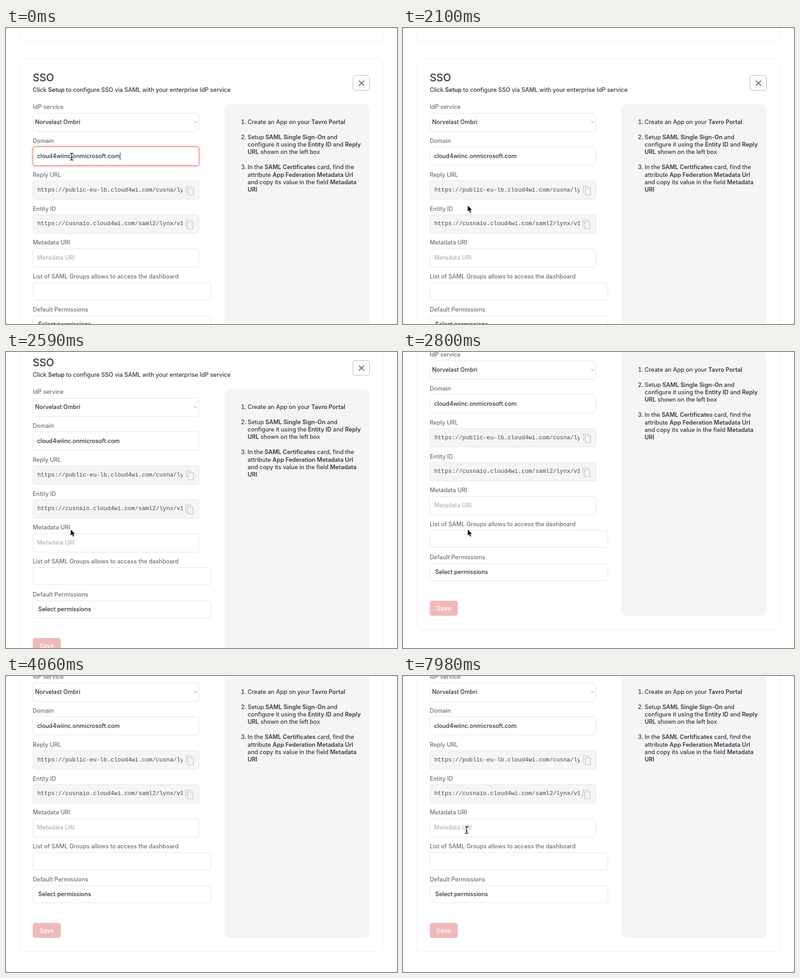
These frames come from a looping animation (848x644 px, 8000 ms). An HTML page:

```html
<!DOCTYPE html>
<html lang="en">
<head>
<meta charset="utf-8">
<title>SSO setup</title>
<style>
html, body { margin: 0; width: 100%; height: 100%; overflow: hidden; background: #fff; }
#stage { position: relative; width: 848px; height: 644px; overflow: hidden; background: #fff;
  font: 500 12.6px Inter, "Liberation Sans", sans-serif; color: #363741; }
#stage div, #stage svg { position: absolute; box-sizing: border-box; }
#page { left: 0; top: 0; width: 848px; height: 830px; }
b { font-weight: 600; }
.text { white-space: pre; line-height: 20px; height: 20px; }
.title { font-size: 22.5px; }
.label { color: #6c7079; }
.value { color: #2d2e36; }
.hint { color: #b2b4b7; }
.mono { font: 400 12.6px/20px "Liberation Mono", monospace; color: #46484e; width: 315px; overflow: hidden; }
.num { width: 30px; text-align: right; font-variant-numeric: tabular-nums; }
.save { font-size: 13.5px; color: #fff; }
.card { border: 1px solid #f2f2f2; border-radius: 8px; box-shadow: 0 0 2px 1px rgba(0, 0, 0, .018); }
.field { border: 1px solid #dfe5e5; border-radius: 5px; background: #fff; }
.off { background: #f5f5f5; }
.panel { background: #f5f5f5; border-radius: 9px; }
.close { border: 1px solid #b1b2b8; border-radius: 5px; }
.button { background: #f1b9b9; border: 1px solid #f4c9c9; border-radius: 5px; }
.ring { border: 1px solid #e5796f; border-radius: 5px; box-shadow: 0 0 4px 1px rgba(229, 100, 90, .55); }
.caret { background: #111; }
#frame { inset: 0; border-radius: 2.5px; box-shadow: 0 0 0 4px #8d8d8d; }
svg { overflow: visible; fill: none; }
</style>
</head>
<body>
<div id="stage">
  <div id="page"></div>
  <svg id="arrow" width="12" height="18" style="left:0;top:0"><path d="M0 0V12.8L2.9 10.1L5.1 15.2L7.2 14.3L5 9.3H9.1Z" fill="#000" stroke="#fff" stroke-width="1.6" paint-order="stroke" stroke-linejoin="round"/></svg>
  <svg id="beam" width="10" height="18" style="left:0;top:0">
    <g id="bar"><path d="M-3.5 -7.5Q-.5 -7.5 0 -6Q.5 -7.5 3.5 -7.5M0 -6V6M-3.5 7.5Q-.5 7.5 0 6Q.5 7.5 3.5 7.5M-2 2.5H2"/></g>
  </svg>
  <div id="frame"></div>
</div>
<script>
const $ = id => document.getElementById(id);
const page = $('page');

function box(cls, x, y, w, h) {
  const el = document.createElement('div');
  el.className = cls;
  el.style.cssText = `left:${x}px;top:${y}px;width:${w}px;height:${h}px`;
  page.append(el);
  return el;
}

// y is the middle of the line
function text(cls, x, y, html) {
  const el = document.createElement('div');
  el.className = 'text ' + cls;
  el.style.left = x + 'px';
  el.style.top = y - 10 + 'px';
  el.innerHTML = html;
  page.append(el);
}

function icon(x, y, d, color, width) {
  page.insertAdjacentHTML('beforeend',
    `<svg width="20" height="22" style="left:${x}px;top:${y}px"><path d="${d}" stroke="${color}" stroke-width="${width}"/></svg>`);
}

box('card', 29, -60, 789, 91);
box('card', 29, 67, 789, 703);
text('title', 58, 107.5, 'SSO');
text('', 58, 135, 'Click <b>Setup</b> to configure SSO via SAML with your enterprise IdP service');
box('close', 752, 103, 37, 33);
icon(765, 114, 'M.5 .5L11.5 11.5M11.5 .5L.5 11.5', '#4b4c54', 1.7);

[['IdP service', 172], ['Domain', 245.5], ['Reply URL', 319.5], ['Entity ID', 393.5],
 ['Metadata URI', 467], ['List of SAML Groups allows to access the dashboard', 541],
 ['Default Permissions', 613]].forEach(([s, y]) => text('label', 58, y, s));

box('field', 58, 185, 361, 41);
text('value', 63, 205, 'Norvelast Ombri');
icon(408, 203, 'M.3 .5L3 3.3L5.7 .5', '#7d8087', 1);

box('field', 58, 258, 361, 41);
const ring = box('ring', 58, 258, 361, 42);
text('value', 67.5, 279, 'cloud4wiinc.onmicrosoft.com');
const caret = box('caret', 246.5, 271, 1, 16);

const copy = 'M1 16V1H13M5 5H16.5V20H5Z';
box('field off', 58, 332, 361, 41);
text('mono', 68, 352.5, 'https://public-eu-lb.cloud4wi.com/cusna/lynx');
icon(390, 343, copy, '#c8cbd0', 1.6);
box('field off', 58, 406, 361, 41);
text('mono', 68, 426, 'https://cusnaio.cloud4wi.com/saml2/lynx/v1');
icon(389, 417, copy, '#c8cbd0', 1.6);

box('field', 58, 480, 361, 41);
text('hint', 67.5, 500, 'Metadata URI');
const groups = box('field', 58, 554, 387, 38);
box('field', 58, 626, 387, 38);
text('value', 70, 644.5, 'Select permissions');
box('button', 58, 707, 61, 33);
text('save', 72.5, 723.5, 'Save');

box('panel', 474, 166, 314, 404 + 170);
const steps = [
  ['Create an App on your <b>Tavro Portal</b>'],
  ['Setup <b>SAML Single Sign-On</b> and', 'configure it using the <b>Entity ID</b> and <b>Reply</b>',
   '<b>URL</b> shown on the left box'],
  ['In the <b>SAML Certificates</b> card, find the', 'attribute <b>App Federation Metadata Url</b>',
   'and copy its value in the field <b>Metadata</b>', '<b>URI</b>']
];
let lineY = 204.9;
steps.forEach((lines, i) => {
  text('num', 491, lineY, i + 1 + '.');
  for (const s of lines) {
    text('', 524, lineY, s);
    lineY += 16.38;
  }
  lineY += 16.38;
});

const bar = $('bar'), shape = bar.innerHTML;
bar.innerHTML = `<g stroke="#fff" stroke-width="2.8">${shape}</g><g stroke="#000" stroke-width="1.3">${shape}</g>`;

// [time, value...]
const scrollKeys = [[2100, 0], [2240, 8], [2380, 30], [2590, 85], [2730, 147], [2800, 166], [2870, 168], [3080, 170]];
const mouseKeys = [
  [560, 142.5, 280], [980, 140.5, 371], [1260, 140.5, 371], [1750, 140.5, 393], [1960, 140.5, 393],
  [2100, 140.5, 386.5], [3220, 140.5, 386.5], [3290, 118, 388], [3500, 26, 370], [3710, 26, 370],
  [4060, -16, 372], [6370, -16, 372], [6440, 157, 419.5], [6580, 171, 441], [6650, 171, 441],
  [7350, 140, 398], [7700, 140, 398], [7980, 138, 335]
];
const linear = p => p, smooth = p => p * p * (3 - 2 * p);

function at(keys, t, ease) {
  if (t <= keys[0][0]) return keys[0].slice(1);
  for (let i = 1; i < keys.length; i++) {
    const a = keys[i - 1], b = keys[i];
    if (t <= b[0]) {
      const p = ease((t - a[0]) / (b[0] - a[0]));
      return a.slice(1).map((v, k) => v + (b[k + 1] - v) * p);
    }
  }
  return keys[keys.length - 1].slice(1);
}

const LOOP = 8000, TICK = 70;

function draw(now) {
  const t = Math.floor(now % LOOP / TICK) * TICK;
  const [scroll] = at(scrollKeys, t, linear);
  const [x, y] = at(mouseKeys, t, smooth);
  const py = y + scroll;
  const over = (top, bottom, right) => x > 58 && x < right && py > top && py < bottom;
  const still = t < 2100 || t > 3220;
  const typing = still && (over(258, 299, 419) || over(480, 521, 419));

  page.style.transform = `translateY(${-scroll}px)`;
  $('arrow').style.display = typing ? 'none' : '';
  $('beam').style.display = typing ? '' : 'none';
  $(typing ? 'beam' : 'arrow').style.transform = `translate(${x}px,${y}px)`;
  groups.style.borderColor = still && over(556, 588, 445) ? '#b3b3b3' : '';
  ring.style.opacity = Math.max(0, Math.min(1, (1680 - t) / 210));
  caret.style.opacity = t < 1470 && t % 980 < 490 ? 1 : 0;
}

const start = performance.now();
(function loop() {
  draw(performance.now() - start);
  requestAnimationFrame(loop);
})();
</script>
</body>
</html>
```
